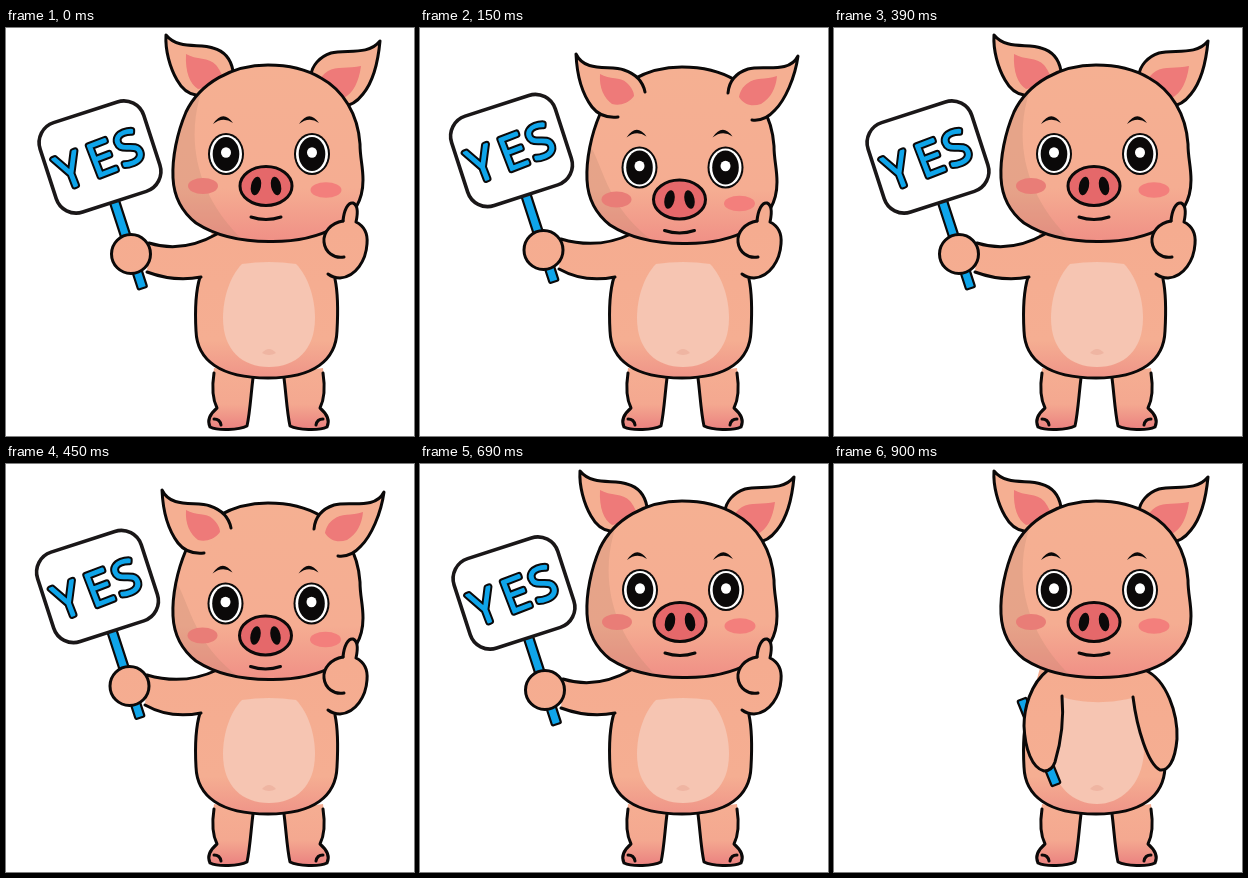
Recreate the animation shown at these times as an HTML page. Size 408x408 px, loop 1050 ms.

```html
<!DOCTYPE html>
<html lang="en">
<head>
<meta charset="utf-8">
<title>Pig with a sign</title>
<style>
  html, body { margin: 0; width: 100%; height: 100%; overflow: hidden; background: #fff; }
  svg { display: block; width: 100%; height: 100%; }
  .line { fill: none; stroke: #0b0909; stroke-width: 3; stroke-linecap: round; stroke-linejoin: round; }
  .skin { fill: url(#skin); }
  .blue { fill: #0fa5ea; stroke: #0b0909; stroke-width: 2.2; }
  .board { fill: #fff; stroke: #1a1718; stroke-width: 3.6; }
  .word { font: 300 46px "Open Sans", "Noto Sans", sans-serif; text-anchor: middle; stroke-linejoin: round; }
</style>
</head>
<body>
<svg id="stage" viewBox="0 0 408 408">
  <defs>
    <linearGradient id="skin" gradientUnits="userSpaceOnUse" x1="0" y1="200" x2="0" y2="350">
      <stop stop-color="#f5ac90"/><stop offset=".75" stop-color="#f5ae92"/><stop offset="1" stop-color="#ef9488"/>
    </linearGradient>
    <linearGradient id="headSkin" gradientUnits="userSpaceOnUse" x1="0" y1="37" x2="0" y2="213">
      <stop stop-color="#f5b092"/><stop offset=".7" stop-color="#f5ad92"/><stop offset="1" stop-color="#f09086"/>
    </linearGradient>
    <linearGradient id="legSkin" gradientUnits="userSpaceOnUse" x1="0" y1="345" x2="0" y2="402">
      <stop stop-color="#f5ad92"/><stop offset=".55" stop-color="#f4a890"/><stop offset="1" stop-color="#ea807f"/>
    </linearGradient>
    <clipPath id="headClip"><path id="headShape" d="M262 37C226 37 194 55 180 84C171 105 166 130 167 150C168 170 176 184 190 195C210 208 236 213.500 263 213.500C290 214 312 209 330 199C348 188 357 172 357 152C357 138 354 130 354 116C352 86 337 62 315 50C300 41 280 37 262 37Z"/></clipPath>
  </defs>
</svg>
<script>
const stage = document.getElementById('stage');

const line = (d, extra = '') => `<path class="line" d="${d}" ${extra}/>`;
const fill = (d, color) => `<path d="${d}" fill="${color}"/>`;
const oval = (x, y, rx, ry, color, extra = '') =>
  `<ellipse cx="${x}" cy="${y}" rx="${rx}" ry="${ry}" fill="${color}" ${extra}/>`;
const shift = (x, y, content) => `<g transform="translate(${x} ${y})">${content}</g>`;

const earsUp = {
  outer: ['M227 43C225 31 218 23 207 20C194 15 172 22 160 7C159 22 164 40 171 52C176 61 183 66 190 67',
          'M305 47C306 38 313 29 325 25C340 21 362 28 374 13C372 35 366 55 357 66C350 75 343 78 337 78'],
  inner: ['M180 26C190 32 203 29 210 37C214 42 215 45 216 47C209 54 199 60 192 61C184 56 179 44 180 26Z',
          'M355 38C343 41 330 38 322 43C317 46 314 50 313 54C322 62 330 68 338 70C347 65 353 54 355 38Z']
};
const earsDown = {
  outer: ['M225 64C223 54 216 46 204 42C190 37 165 45 156 26C157 50 163 67 172 79C179 88 188 90 198 89',
          'M308 65C309 53 316 45 328 41C344 37 369 46 378 28C375 50 365 72 355 82C347 91 340 93 332 92'],
  inner: ['M180 46C190 52 200 48 207 55C212 60 214 64 214 68C208 76 199 78 192 76C184 70 179 60 180 46Z',
          'M357 48C345 52 335 49 328 55C322 59 320 64 319 69C324 77 332 79 341 76C351 70 356 60 357 48Z']
};
const ears = ({ outer, inner }) =>
  outer.map(d => fill(d, '#f5af92') + line(d)).join('') + inner.map(d => fill(d, '#ee7a79')).join('');

const brow = x => fill(`M${x - 10} 96Q${x} 81 ${x + 10} 95Q${x} 88 ${x - 10} 96Z`, '#0b0909');
const eye = x => oval(x, 126, 18, 21, '#0b0909') + oval(x, 126, 16, 19, '#fff') +
  oval(x, 126, 13.3, 17, '#0b0909') + oval(x, 124.5, 5, 5.2, '#fff');
const face =
  oval(197, 158, 15, 8, '#e97d77') + oval(320, 162, 15.5, 7.8, '#f37f7c') +
  eye(220) + eye(306) + brow(217) + brow(303) +
  oval(260, 158, 26, 19.5, '#e5686a', 'stroke="#0b0909" stroke-width="3"') +
  oval(250, 158, 5, 9.5, '#0b0909', 'transform="rotate(12 250 158)"') +
  oval(270, 158, 5, 9.5, '#0b0909', 'transform="rotate(-12 270 158)"') +
  line('M245 189Q260 194 275 189');

const skull = shade => `<use href="#headShape" fill="url(#headSkin)"/>
  <path clip-path="url(#headClip)" d="${shade}" fill="#b9846c" opacity=".25"/>
  <use href="#headShape" class="line"/>`;

const head = nodding => nodding
  ? shift(0, 2, skull('M160 100C186 130 180 175 240 216L150 216Z')) + ears(earsDown) + shift(-.5, 13.5, face)
  : ears(earsUp) + skull('M206 40C178 90 180 160 240 215L150 215L150 40Z') + face;

const leg =
  fill('M208 340C206 358 207 372 211 380C204 386 201 393 204 399C212 403 233 402 241 398C244 385 245 365 247 345Z', 'url(#legSkin)') +
  line('M208 345C206 358 207 372 211 380C204 386 201 393 204 399C212 403 233 402 241 398C244 385 245 365 247 350') +
  line('M208 391Q214 391 215 397', 'stroke-width="2"');
const legs = leg + `<g transform="translate(525 0) scale(-1 1)">${leg}</g>`;

const flank = '194 249C190 262 189 285 190 303C191 332 214 350 262 350C308 350 330 332 331 303C332 285 332 265 329 251';
const torso = shoulder => `<path class="skin" d="M207 200L${flank}L${shoulder} 200Z"/>` + line('M' + flank);
const bellyColor = '#f6c5b2';
const navel = fill('M256 325Q263 317 270 325Q263 329 256 325Z', '#efb5a2');
const belly = fill('M236 236Q263 232 290 236C302 248 309 270 309 290C309 322 290 339 263 339C236 339 217 322 217 290C217 270 224 248 236 236Z', bellyColor) + navel;

const word = '<tspan x="-33 1 30">YES</tspan>';
const sign = `<g transform="rotate(-18)">
  <rect class="blue" x="-4.7" y="44" width="9.4" height="94" rx="1.5"/>
  <rect class="board" x="-54.5" y="-47" width="109" height="94" rx="21"/>
  <g class="word" transform="rotate(-3)">
    <text y="18" fill="#0b0909" stroke="#0b0909" stroke-width="6.6">${word}</text>
    <text y="18" fill="#0fa5ea" stroke="#0fa5ea" stroke-width="2.6">${word}</text>
  </g></g>`;

const fistEdge = 'M337 193C325 195 317 204 318 214C319 224 328 231 338 229';
const fistOuter = 'M337 193C338 182 342 174 347 175C352 177 352 185 350 194C358 198 362 206 361 216C360 232 350 249 334 250C329 250 326 249 322 246';
const thumbUp = fill(fistOuter + 'L318 214C317 204 325 195 337 193Z', 'url(#skin)') + line(fistEdge) + line(fistOuter);

// The raised arm and the sign move together; the shoulder stays put.
function holding(lifted) {
  const [signX, signY] = lifted ? [91.5, 122.5] : [94, 129];
  const [handX, handY] = lifted ? [123.5, 222] : [125, 226];
  const top = lifted ? 'M141 211C165 218 190 216 211 206' : 'M143 215C165 222 188 219 211 206';
  const under = lifted ? '195 249C175 253 155 250 139 241' : '195 249C180 252 160 251 141 244';
  return legs + torso(334) + `<path class="skin" d="${top}L${under}Z"/>` + line(top) + line('M' + under) + belly +
    shift(signX, signY, sign) +
    oval(handX, handY, 19.5, 19.5, 'url(#skin)', 'stroke="#0b0909" stroke-width="3"') +
    head(lifted) + thumbUp;
}

function resting() {
  const arms = [
    'M214 206C196 220 190 245 190 262C191 285 198 304 210 307C215 307 219 304 221 298C227 278 230 255 228 232',
    'M311 206C333 216 344 250 343 275C341 298 334 307 326 306C314 300 303 265 299 233'
  ];
  const widerBelly = fill('M226 232C245 240 280 240 301 233L310 288C308 322 286 340 263 340C240 340 219 322 218 295Z', bellyColor);
  const stick = '<rect class="blue" x="-4.7" y="-46" width="9.4" height="92" rx="1.5" transform="translate(205 278) rotate(-22)"/>';
  return legs + torso(306) + widerBelly + navel + stick +
    arms.map(d => `<path class="skin" d="${d}"/>` + line(d)).join('') + head(false);
}

const poses = [holding(false), holding(true), resting()].map(content => {
  const group = document.createElementNS('http://www.w3.org/2000/svg', 'g');
  group.innerHTML = content;
  return stage.appendChild(group);
});

function draw() {
  const step = Math.floor(performance.now() % 1050 / 150);
  const current = step === 6 ? 2 : step % 2;
  poses.forEach((group, i) => group.style.display = i === current ? '' : 'none');
  requestAnimationFrame(draw);
}
draw();
</script>
</body>
</html>
```
